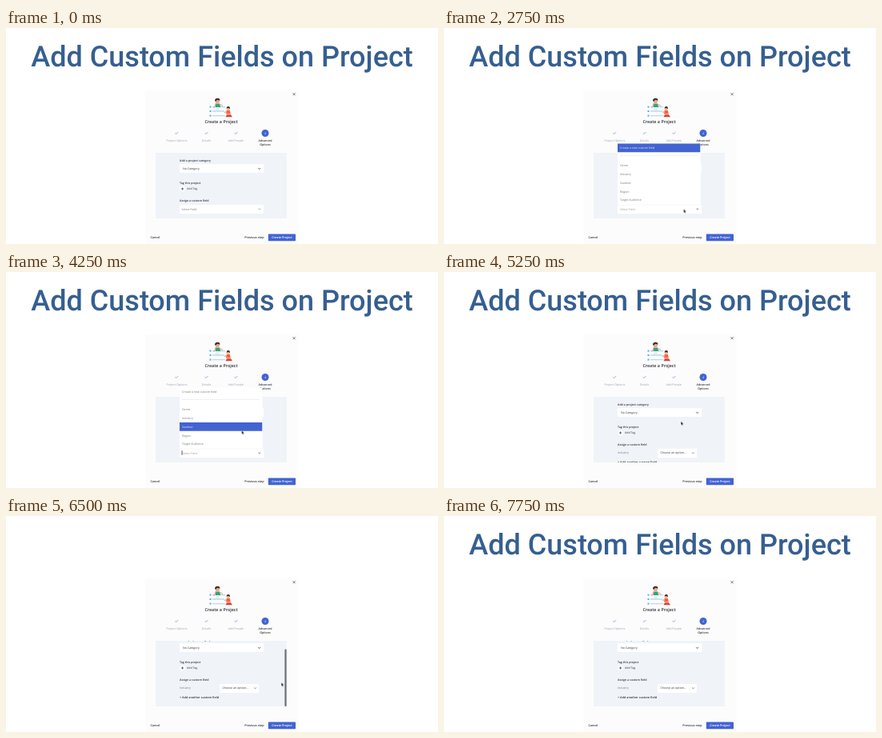
An HTML page for the animation above (8750 ms loop, 540 by 270 pixels).

```html
<!DOCTYPE html>
<html lang="en">
<head>
<meta charset="utf-8">
<title>Add Custom Fields on Project</title>
<style>
html, body { margin: 0; width: 100%; height: 100%; overflow: hidden; background: #fff; }
svg { display: block; width: 540px; height: 270px; }
text { font: 400 3.6px "Open Sans", "Noto Sans", sans-serif; text-rendering: geometricPrecision; }
.title { font: 500 36px Roboto, Inter, sans-serif; fill: #365f91; animation-name: title; }
.bold { font-weight: 600; }
.head { font-size: 5.4px; font-weight: 600; }
.foot { font-size: 3.75px; font-weight: 600; }
.mid { text-anchor: middle; }
.dim { fill: #9a9db2; }
.soft { fill: #777; }
.line { fill: none; stroke-width: .7; stroke-linecap: round; stroke-linejoin: round; }

/* Every state holds until the next one: hard cuts on a 250 ms grid */
.anim { animation-duration: 8750ms; animation-timing-function: step-end; animation-iteration-count: infinite; }
.closed { animation-name: closed; }
.open { animation-name: open; }
.chosen { animation-name: chosen; }
.scroll { animation-name: scroll; }
.bar { animation-name: bar; }
.caret { animation-name: caret; }
.arrow { animation-name: arrow; }
.mark { animation-name: mark; }
.cursor { animation-name: cursor; }

@keyframes title { 0%, 79.99% { opacity: 1 } 74.28% { opacity: 0 } 100% { opacity: 1 } }
@keyframes closed { 0% { opacity: 1 } 59.99%, 100% { opacity: 0 } }
@keyframes open { 0%, 59.99%, 100% { opacity: 0 } 25.71% { opacity: 1 } }
@keyframes chosen { 0% { opacity: 0 } 59.99%, 100% { opacity: 1 } }
@keyframes scroll { 0% { transform: translateY(0) } 71.42%, 100% { transform: translateY(-11px) } }
@keyframes bar { 0%, 82.85%, 100% { opacity: 0 } 71.42% { opacity: 1 } }
@keyframes caret {
  0%, 31.42%, 42.85%, 54.28%, 100% { opacity: 0 }
  25.71%, 37.14%, 48.57% { opacity: 1 }
}
@keyframes arrow { 0% { stroke: #aaa } 28.57%, 100% { stroke: #3c4560 } }
@keyframes mark {
  0% { transform: translateY(0) }
  45.71% { transform: translateY(65.5px) }
  48.57% { transform: translateY(43.5px) }
  54.28%, 100% { transform: translateY(32.5px) }
}
@keyframes cursor {
  0% { opacity: 0; transform: translate(359.5px, 209px) }
  17.14% { opacity: 1; transform: translate(359.5px, 209px) }
  19.99% { opacity: 1; transform: translate(310px, 222px) }
  22.85% { opacity: 1; transform: translate(299.6px, 226.5px) }
  45.71% { opacity: 1; transform: translate(298px, 212px) }
  48.57% { opacity: 1; transform: translate(294.6px, 198.2px) }
  51.42% { opacity: 1; transform: translate(293.2px, 194.2px) }
  54.28% { opacity: 1; transform: translate(291.2px, 186.6px) }
  59.99% { opacity: 1; transform: translate(296.2px, 186.8px) }
  62.85% { opacity: 0; transform: translate(296.2px, 186.8px) }
  68.57% { opacity: 1; transform: translate(353.2px, 191.8px) }
  71.42% { opacity: 1; transform: translate(348px, 203px) }
  74.28% { opacity: 1; transform: translate(344.2px, 208.2px) }
  85.71% { opacity: 1; transform: translate(346.2px, 208.2px) }
  88.57%, 100% { opacity: 0; transform: translate(346.2px, 208.2px) }
}
</style>
</head>
<body>
<svg viewBox="0 0 540 270" fill="#30323a">
  <defs>
    <clipPath id="panel"><rect x="187" y="156" width="164" height="82"/></clipPath>
    <clipPath id="lit"><rect class="anim mark" x="217" y="144.5" width="103.5" height="10.8"/></clipPath>
    <path id="check" class="line" d="M-1.6 0 L-.5 1.1 L1.7 -1.2"/>
    <path id="chev" class="line" d="M-1.2 -.6 L0 .6 L1.2 -.6"/>
    <g id="rows">
      <text x="220" y="150.8">Create a new custom field</text>
      <text x="220" y="172.8">Genre</text>
      <text x="220" y="183.8">Industry</text>
      <text x="220" y="194.7">Number</text>
      <text x="220" y="205.7">Region</text>
      <text x="220" y="216.4">Target Audience</text>
    </g>
  </defs>

  <text class="title mid anim" x="270" y="48">Add Custom Fields on Project</text>

  <rect x="174.5" y="78" width="191.5" height="192" fill="#fcfcfc"/>
  <path class="line" stroke="#444" d="M358.8 81.4 l2.6 2.6 m0 -2.6 l-2.6 2.6"/>

  <!-- people arranging a task list -->
  <g>
    <g stroke="#b9d8f5" stroke-width="1.4">
      <path d="M258 98.6 h16 M258 104 h15 M258 109.6 h16"/>
    </g>
    <g fill="#5aa9ee">
      <rect x="254.5" y="97.6" width="2" height="2"/>
      <rect x="254.5" y="103" width="2" height="2"/>
      <rect x="254.5" y="108.6" width="2" height="2"/>
    </g>
    <path d="M261.5 94.5 h5.5 l1.3 4.6 h-6.4z" fill="#2fa57c"/>
    <path d="M267 95.3 l4 2.2" stroke="#eda98a" stroke-width="1.3"/>
    <path d="M262 95.5 l-2.2 4.2" stroke="#eda98a" stroke-width="1.3"/>
    <path d="M262.5 99 h5 l-1 4 h-5z" fill="#e9eef6"/>
    <circle cx="264.3" cy="91.7" r="2.6" fill="#eda98a"/>
    <path d="M261 91.2 q-.2 -3.6 3.5 -3.5 q3.4 .1 2.8 3 q-2 -.9 -3.6 -.6 q-.4 2 -2.7 1.1z" fill="#4b2c2b"/>
    <path d="M275.8 102.8 h4 l1 4.6 h-5.8z" fill="#f0673f"/>
    <path d="M276 103.6 l-3 2.4" stroke="#eda98a" stroke-width="1.2"/>
    <path d="M276 108.2 h5 l2 3 h-8.5z" fill="#d9433c"/>
    <circle cx="277.6" cy="100.6" r="2" fill="#eda98a"/>
    <path d="M275.6 100.2 q.2 -2.5 2.5 -2.3 q2.3 .4 1.6 3.4 l-1.4 -1.2z" fill="#4b2c2b"/>
  </g>
  <text class="head mid" x="269" y="119">Create a Project</text>

  <g stroke="#7386d6">
    <use href="#check" x="213.2" y="131.5"/>
    <use href="#check" x="250.5" y="131.5"/>
    <use href="#check" x="287.4" y="131.5"/>
  </g>
  <g class="mid dim">
    <text x="213.5" y="142.2">Project Options</text>
    <text x="250.5" y="142.2">Details</text>
    <text x="287.3" y="142.2">Add People</text>
  </g>
  <circle cx="324" cy="131.5" r="4.5" fill="#4263d2"/>
  <text class="mid" x="324" y="132.8" fill="#fff">4</text>
  <g class="mid">
    <text class="bold" x="324" y="142.2">Advanced</text>
    <text class="bold" x="324" y="147.2">Options</text>
  </g>

  <rect x="187" y="156" width="164" height="82" fill="#f0f4f9"/>
  <g clip-path="url(#panel)">
    <g class="anim scroll">
      <text class="bold" x="217" y="166.6">Add a project category</text>
      <rect x="217" y="170.2" width="105" height="10.8" fill="#fff"/>
      <text x="221" y="177.1">No Category</text>
      <use href="#chev" x="316.6" y="175.9" stroke="#222"/>

      <text class="bold" x="217" y="194.9">Tag this project</text>
      <circle cx="220.6" cy="201" r="3.2" fill="#fff"/>
      <path class="line" stroke="#333" d="M219.4 201 h2.4 m-1.2 -1.2 v2.4"/>
      <text x="226" y="202.4">Add Tag</text>

      <text class="bold" x="217" y="217.2">Assign a custom field</text>
      <g class="anim closed">
        <rect x="217" y="221" width="105" height="11" fill="#fff"/>
        <text class="soft" x="219.5" y="227.6">Select Field</text>
        <use href="#chev" x="316.8" y="226.4" stroke="#888"/>
      </g>
      <g class="anim chosen">
        <text class="soft" x="217" y="227.3">Industry</text>
        <rect x="267" y="221" width="49" height="11" fill="#fff"/>
        <text x="270.5" y="227.4">Choose an option...</text>
        <use href="#chev" x="311.5" y="226.3" stroke="#666"/>
        <text class="foot" x="217" y="239.2">+ Add another custom field</text>
      </g>
    </g>
  </g>
  <rect class="anim bar" x="348.4" y="166.5" width="2.2" height="71.5" rx="1" fill="#6d7076"/>

  <g class="anim open">
    <rect x="217" y="144.5" width="103.5" height="87.5" fill="#fff"/>
    <path d="M220 159.5 h97" stroke="#e4e6ea" stroke-width=".6"/>
    <use href="#rows" class="soft"/>
    <g clip-path="url(#lit)">
      <rect x="217" y="144" width="103.5" height="78" fill="#4263d2"/>
      <use href="#rows" fill="#e8ecfb"/>
    </g>
    <path d="M217 221 h103.5" stroke="#eceef2" stroke-width=".5"/>
    <text x="220" y="227.6" fill="#999">Select Field</text>
    <path class="line anim arrow" d="M315.8 225.9 l1 .9 l1 -.9"/>
    <rect class="anim caret" x="219.6" y="223.2" width=".8" height="5.6" fill="#333"/>
  </g>

  <text class="foot" x="180.4" y="263.2">Cancel</text>
  <text class="foot" x="298.3" y="263.2">Previous step</text>
  <rect x="327.8" y="257.6" width="34.2" height="8.6" rx=".8" fill="#4263d2"/>
  <text class="foot mid" x="344.9" y="263.2" fill="#fff">Create Project</text>

  <path class="anim cursor" d="M0 0 V4.3 L1 3.5 L1.7 5 L2.5 4.6 L1.8 3.2 L3 3.1z" fill="#111" stroke="#fff" stroke-width=".2"/>
</svg>
</body>
</html>
```
